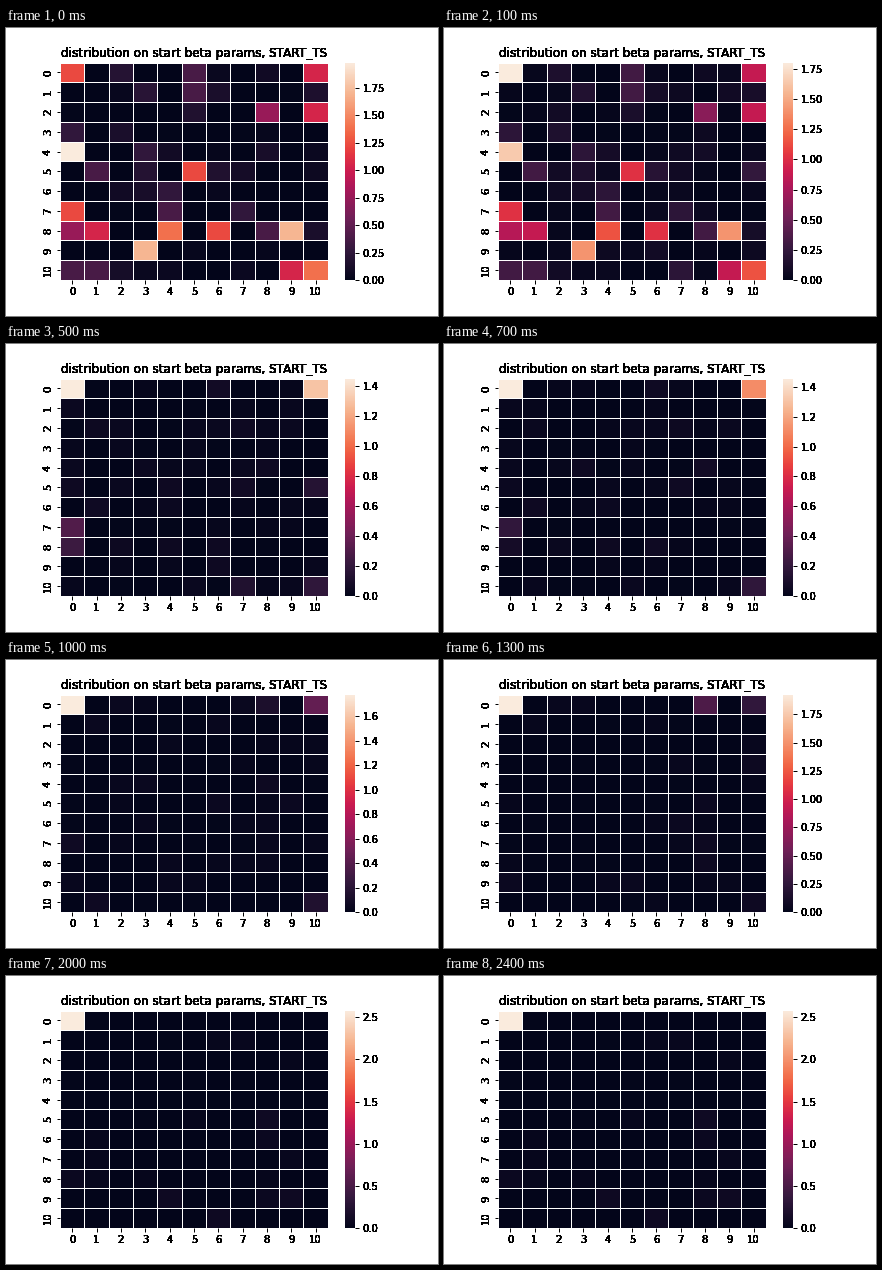
Recreate the animation shown at these times as a matplotlib script. Size 432 px wide and 288 px high, loop 2500 ms.

```python
import matplotlib.pyplot as plt
import numpy as np
from matplotlib.animation import FuncAnimation
from matplotlib.colors import LinearSegmentedColormap
from matplotlib.ticker import MaxNLocator

W, H, DPI = 432, 288, 72
N = 11
FRAMES, INTERVAL = 25, 100
LEFT, BOTTOM, TOP = 54, 36, 253.44
HEAT_W, BAR_X = 267.84, 338.58
BAR_W = (TOP - BOTTOM) / 20

CMAP = LinearSegmentedColormap.from_list("ember", [
    (0, "#03051a"), (1 / 7, "#35193e"), (2 / 7, "#701f57"),
    (3 / 7, "#ad1759"), (1 / 2, "#cb1b4f"), (4 / 7, "#e13342"),
    (3 / 5, "#e83f3f"), (2 / 3, "#f06043"), (5 / 7, "#f37651"),
    (6 / 7, "#f6b48f"), (1, "#faebdd"),
], N=256)

# Cells lit at the start, grouped by strength
START = {
    1: [(4, 0)],
    .86: [(8, 9), (9, 3)],
    .7: [(8, 4), (10, 10)],
    .62: [(5, 5), (7, 0), (8, 6)],
    .53: [(0, 10), (2, 10), (8, 1), (10, 9)],
    .38: [(2, 8), (8, 0)],
    .19: [(0, 5), (1, 5), (5, 1), (7, 4), (8, 8), (10, 0), (10, 1)],
    .13: [(3, 0), (4, 3), (6, 4), (7, 7)],
}
START_FADE = 1.6
# Later glows: row, column, strength, brightest frame, spread in frames
GLOWS = [
    (0, 10, .9, 5.3, 4.2), (0, 10, .13, 13, 2), (5, 10, .27, 3, 2),
    (7, 0, .25, 3, 5), (8, 0, .34, 1.5, 4), (10, 7, .23, 3, 2),
    (10, 10, .13, 6, 6), (0, 8, .2, 13, 3),
]
# Maximum of the scale over time
PEAK_AT = [0, 3, 7, 10, 13, 15, 16, 17, 18, 20, 22, 23, 24]
PEAKS = [1.98, 1.45, 1.455, 1.777, 1.926, 2.63, 2.63,
         2.84, 2.84, 2.58, 2.85, 2.85, 2.58]

# Faint background, redrawn every few frames until it comes to rest
NOISE_STEP, NOISE_END = 3, 15
rng = np.random.default_rng(4)
NOISE = rng.random((NOISE_END // NOISE_STEP + 2, N, N)) ** 8


def bump(i, center, spread):
    return np.exp(-((i - center) / spread) ** 2)


def noise_at(i):
    t = min(i, NOISE_END)
    k, part = divmod(t / NOISE_STEP, 1)
    k = int(k)
    strength = 0.04 + 0.08 * np.exp(-t / 5)
    return strength * ((1 - part) * NOISE[k] + part * NOISE[k + 1])


def grid_at(i):
    grid = noise_at(i)
    fade = bump(i, 0, START_FADE)
    for strength, cells in START.items():
        for cell in cells:
            grid[cell] = max(grid[cell], strength * fade)
    for r, c, strength, center, spread in GLOWS:
        grid[r, c] = max(grid[r, c], strength * bump(i, center, spread))
    grid[0, 0] = 1 - 0.38 * fade
    return grid / grid.max()


fig = plt.figure(figsize=(W / DPI, H / DPI), dpi=DPI, facecolor="white")


def add_axes(x, width):
    ax = fig.add_axes([x / W, BOTTOM / H, width / W, (TOP - BOTTOM) / H])
    ax.spines[:].set_visible(False)
    ax.tick_params(length=3.5, width=1)
    return ax


def heavy_text(x, y, text, size=10, **style):
    """Stack copies so that the soft glyph edges turn black."""
    return [fig.text(x / W, y / H, text, fontsize=size, color="black",
                     family="DejaVu Sans", **style) for _ in range(16)]


heat = add_axes(LEFT, HEAT_W)
mesh = heat.pcolormesh(grid_at(0), cmap=CMAP, vmin=0, vmax=1,
                       edgecolors="white", linewidth=1)
heat.set(xlim=(0, N), ylim=(N, 0))
centers = np.arange(N) + 0.5
heat.set_xticks(centers, [""] * N)
heat.set_yticks(centers, [""] * N)
for n, c in enumerate(centers / N):
    heavy_text(LEFT + c * HEAT_W, BOTTOM - 7, str(n), ha="center", va="top")
    heavy_text(LEFT - 7, TOP - c * (TOP - BOTTOM), str(n),
               ha="right", va="center", rotation=90)
heavy_text(LEFT + HEAT_W / 2, TOP + 6,
           "distribution on start beta params, START_TS",
           size=12, ha="center", va="baseline")

bar = add_axes(BAR_X, BAR_W)
shades = np.linspace(0, 1, 257)
bar.pcolormesh([0, 1], shades, shades[:-1, None], cmap=CMAP, vmin=0, vmax=1)
bar.set_xticks([])
bar.yaxis.tick_right()

locator = MaxNLocator(9, steps=[1, 2, 2.5, 5, 10])
bar_labels = []


def update(i):
    mesh.set_array(grid_at(i))
    peak = np.interp(i, PEAK_AT, PEAKS)
    levels = [v for v in locator.tick_values(0, peak) if 0 <= v <= peak]
    digits = 2 if abs(levels[1] - 0.25) < 1e-6 else 1
    while bar_labels:
        bar_labels.pop().remove()
    bar.set_yticks([v / peak for v in levels], [""] * len(levels))
    bar.set_ylim(0, 1)
    for v in levels:
        y = BOTTOM + v / peak * (TOP - BOTTOM)
        bar_labels.extend(heavy_text(BAR_X + BAR_W + 7, y, f"{v:.{digits}f}",
                                     ha="left", va="center_baseline"))
    return [mesh, *bar_labels]


anim = FuncAnimation(fig, update, frames=FRAMES, interval=INTERVAL,
                     init_func=lambda: update(0), repeat=True,
                     repeat_delay=0, blit=False)
plt.show()
```
